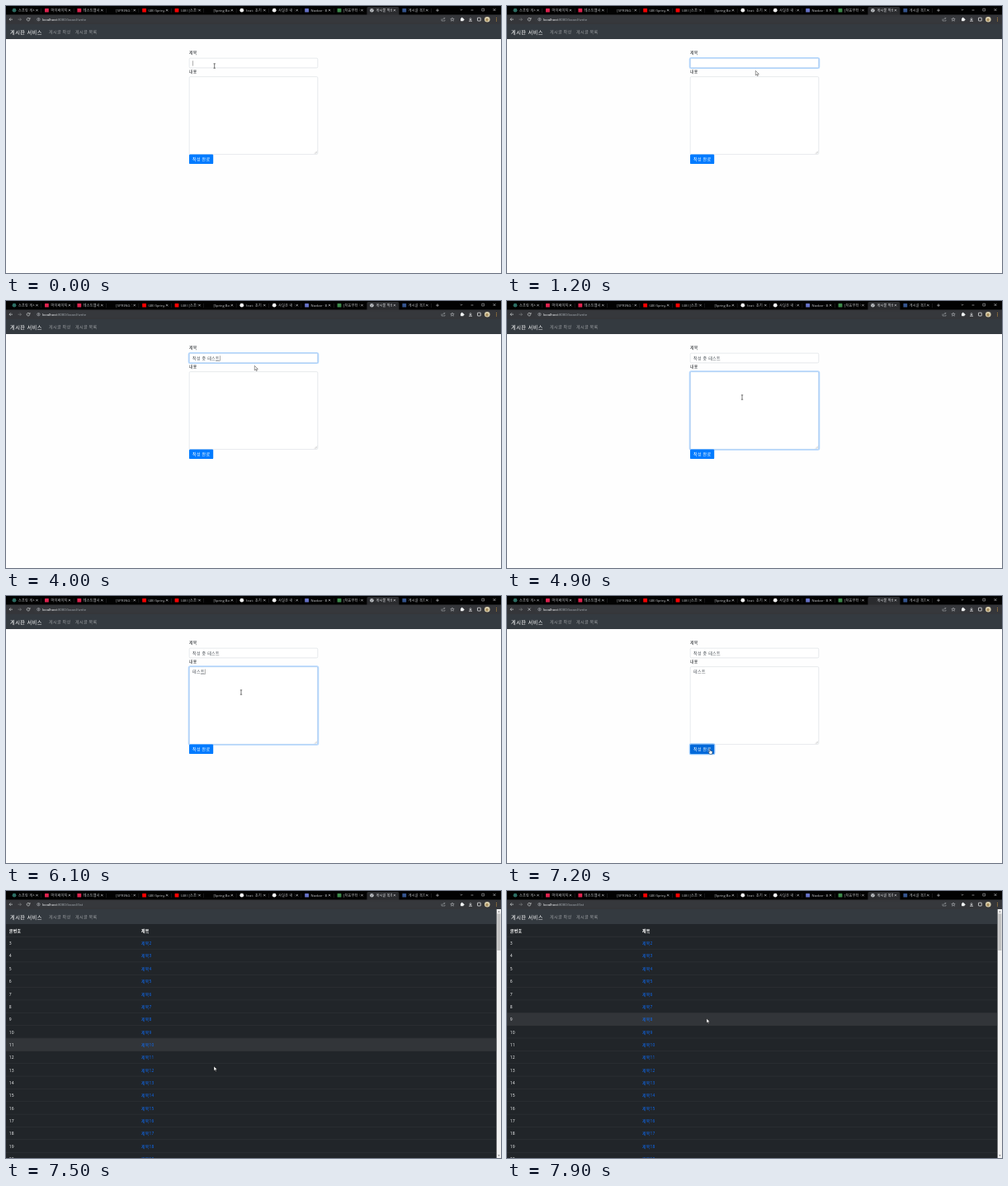
These frames come from a looping animation (600 by 323 pixels, 8000 ms). An HTML page with a canvas:

```html
<!DOCTYPE html>
<html lang="ko">
<head>
<meta charset="utf-8">
<title>게시판 서비스</title>
<style>
html, body { margin: 0; height: 100%; overflow: hidden; background: #fff; }
canvas { display: block; width: 100vw; height: 100vh; }
</style>
</head>
<body>
<canvas id="stage"></canvas>
<script>
const W = 600, H = 323, LOOP = 8000, LIST_AT = 7300;
const canvas = document.getElementById('stage');
const c = canvas.getContext('2d');

// [favicon shape, colour, title]
const tabs = [
  ['circle', '#2c6d63', '스프링 게시판'], ['square', '#e0224e', '마이페이지'],
  ['square', '#e0224e', '테스트웹사이트'], ['', '', '[SPRING 의존'],
  ['square', '#f00', '(48) Spring B'], ['square', '#f00', '(48) [스프링'],
  ['', '', '[Spring Boot'], ['circle', '#f2f2f2', 'feat: 초기 설'],
  ['circle', '#f2f2f2', '사실은 내 것'], ['square', '#6672c8', 'Navbar · Boo'],
  ['square', '#3c8a4a', '[처음부터 하'], ['globe', '#c4c7cb', '게시물 작성'],
  ['square', '#35558f', '게시글 목록']
];

// Hangul input, one composition step per entry
const titleKeys = [[0, ''], [1800, 'ㅈ'], [1900, '자'], [2100, '작'], [2300, '잓'],
  [2400, '작서'], [2600, '작성'], [2900, '작성 '], [3000, '작성 ㅈ'], [3200, '작성 주'],
  [3300, '작성 중'], [3400, '작성 중 ㅌ'], [3500, '작성 중 테'], [3600, '작성 중 텟'],
  [3700, '작성 중 테슽'], [4000, '작성 중 테스트']];
const bodyKeys = [[0, ''], [5000, 'ㅌ'], [5200, '테'], [5300, '텟'], [5500, '테스'], [6100, '테스트']];
const pointer = [[0, 252.7, 72.5, 'beam'], [500, 276, 72.5, 'beam'], [600, 298, 73, 'beam'],
  [800, 301.3, 78.3, 'arrow'], [4400, 285, 116.5, 'beam'], [6600, 270, 150, 'beam'],
  [6700, 256, 180, 'beam'], [6900, 245.5, 185, 'hand'], [7300, 256.2, 200.4, 'arrow'],
  [7500, 252, 212, 'arrow'], [7700, 247, 197, 'arrow'], [7900, 241.9, 154.2, 'arrow']];
const hovers = [[0, 11], [7700, 12], [7900, 9]];
const blinks = [[0, true], [500, false], [800, true], [1200, false], [1400, true]];

const at = (keys, t) => keys.filter(k => k[0] <= t).pop();
const ramp = (t, from, to) => Math.max(0, Math.min(1, (t - from) / (to - from)));

function rect(x, y, w, h, fill) {
  c.fillStyle = fill;
  c.fillRect(x, y, w, h);
}
function round(x, y, w, h, r, fill, stroke, lw = .4) {
  c.beginPath();
  c.roundRect(x, y, w, h, r);
  if (fill) { c.fillStyle = fill; c.fill(); }
  if (stroke) { c.strokeStyle = stroke; c.lineWidth = lw; c.stroke(); }
}
function dot(x, y, r, fill) {
  c.beginPath();
  c.arc(x, y, r, 0, 7);
  c.fillStyle = fill;
  c.fill();
}
function ring(x, y, r, color, from = 0, to = 7) {
  c.beginPath();
  c.arc(x, y, r, from, to);
  c.strokeStyle = color;
  c.lineWidth = .6;
  c.stroke();
}
function path(d, x, y, stroke, lw = .6, fill) {
  const p = new Path2D(d);
  c.save();
  c.translate(x, y);
  if (fill) { c.fillStyle = fill; c.fill(p); }
  c.strokeStyle = stroke;
  c.lineWidth = lw;
  c.stroke(p);
  c.restore();
}
// y is the middle of the line; Hangul is set slightly loose; returns the right end
function text(s, x, y, size, color, weight = 400, family = '"Open Sans"') {
  const hangul = /[ㄱ-ㅎ가-힣]/.test(s);
  c.font = `${weight} ${size}px ${family}, "Noto Sans CJK KR", "Noto Sans CJK", sans-serif`;
  c.letterSpacing = (hangul ? size * .07 : 0) + 'px';
  c.fillStyle = color;
  c.fillText(s, x, y + size * (hangul ? .38 : .36));
  return x + c.measureText(s).width;
}
const cross = (x, y, r, color) => path(`M${-r} ${-r}L${r} ${r}M${r} ${-r}L${-r} ${r}`, x, y, color);

function drawTab([shape, color, title], i, loading, list) {
  const x = 10 + 39.4 * i, active = i === 11;
  if (active) round(x - 6, 1, 39, 11, [2, 2, 0, 0], '#2a2b2e');
  else if (i !== 10) rect(x + 32.5, 3, .4, 5, '#3a3b3e');
  if (shape === 'circle') dot(x, 5.2, 2.4, color);
  if (shape === 'square') round(x - 2.4, 3, 4.8, 4.5, .5, color);
  if (shape === 'globe' && !loading) {
    dot(x, 5.2, 2.3, color);
    path('M-1.6 -.6L.2 .2L-.4 1.6M.6 -1.8L1.6 0', x, 5.2, '#55585c');
  }
  c.save();
  c.beginPath();
  c.rect(x + 4.5, 0, 20, 10);
  c.clip();
  text(active && list ? '게시글 목록' : title, x + 5, 5.2, 4.05, active ? '#e8eaed' : '#c6c8cb');
  c.restore();
  cross(x + 27.5, 5.2, 1.2, '#d0d2d5');
}

function drawBrowser(loading, list) {
  rect(0, 0, W, 11, '#020202');
  tabs.forEach((tab, i) => drawTab(tab, i, loading, list));
  path('M-1.8 0H1.8M0 -1.8V1.8', 523, 5.2, '#d0d2d5');
  path('M-1.3 -.6L0 .7L1.3 -.6', 552, 4.6, '#d0d2d5');
  path('M-1.4 0H1.4', 565, 5, '#d0d2d5');
  round(576.8, 3.2, 2.8, 2.8, 0, null, '#d0d2d5', .5);
  cross(592, 4.6, 1.4, '#d0d2d5');

  rect(0, 10.5, W, 11.5, '#35363a');
  round(33, 12.3, 515, 7.8, 3.9, '#36383c');
  path('M2 0H-2M-.2 -1.8L-2 0L-.2 1.8', 6, 16.2, '#e0e2e5');
  path('M-2 0H2M.2 -1.8L2 0L.2 1.8', 16.5, 16.2, '#85878a');
  if (loading) cross(27, 16.2, 1.6, '#e0e2e5');
  else {
    ring(27, 16.2, 1.8, '#e0e2e5', .3, 5.6);
    path('M2 -2.2V-.3H.2', 27, 16.2, '#e0e2e5');
  }
  ring(39.4, 16.2, 1.7, '#b5b8bc');
  rect(39.1, 15.1, .6, 2.2, '#b5b8bc');
  const x = text('localhost', 44, 16.1, 4.36, '#f1f3f4', 400, 'Roboto');
  text(':8080/board/' + (list ? 'list' : 'write'), x, 16.1, 4.36, '#9aa0a6', 400, 'Roboto');

  path('M-2 -.5V2H2V.8M-.8 .6Q-.6 -1.2 2 -1.2M1 -2.2L2 -1.2L1 -.2', 530, 16, '#b5b8bc', .5);
  path('M0 -2.2L.6 -.7L2.2 -.6L1 .4L1.4 2L0 1.1L-1.4 2L-1 .4L-2.2 -.6L-.6 -.7Z', 541, 16.2, '#c4c7cb', .5);
  round(551, 14.8, 3.6, 3.4, .4, '#f1f3f4');
  dot(552.7, 14.6, .8, '#f1f3f4');
  dot(554.8, 16.5, .8, '#f1f3f4');
  path('M0 -2V1M-1.4 -.3L0 1L1.4 -.3M-2 2H2', 563, 16.2, '#f1f3f4', .7);
  round(571.5, 14.2, 3.8, 3.8, .4, null, '#f1f3f4', .7);
  dot(583.3, 16.2, 3.3, '#d9cfae');
  dot(583, 16.8, 1.7, '#a58a58');
  for (const y of [14.4, 16.2, 18]) dot(594.5, y, .5, '#e0a33e');

  rect(0, 22, W, 18, '#343a40');
  text('게시판 서비스', 5, 31.3, 6.2, '#fff');
  text('게시글 작성', 52, 31.2, 5, '#9a9da0');
  text('게시글 목록', 84, 31.2, 5, '#9a9da0');
}

function drawField(y, h, focus) {
  if (focus) round(221.4, y - .6, 157.2, h + 1.2, 1.8, null, `rgba(0,123,255,${.28 * focus})`, 1.4);
  round(222.2, y, 155.6, h, 1.2, '#fff', '#ced4da', .5);
  if (focus) {
    c.globalAlpha = focus;
    round(222.2, y, 155.6, h, 1.2, null, '#80bdff', .5);
    c.globalAlpha = 1;
  }
}
function drawEntry(s, y, caret, composing) {
  const end = text(s, 226, y, 5, '#495057');
  if (composing && s && !s.endsWith(' ')) rect(end - 5, y + 3, 5, .4, '#495057');
  if (caret) rect(end + .1, y - 3, .4, 6.3, '#333');
}

function drawForm(t) {
  rect(0, 40, W, H - 40, '#fefefe');
  const inTitle = t < 4450, inBody = t >= 4450 && t < 7000;
  const titleGlow = ramp(t, 50, 250) * (1 - ramp(t, 4350, 4500));
  const bodyGlow = ramp(t, 4350, 4500) * (1 - ramp(t, 6950, 7100));
  text('제목', 222, 56.2, 4.9, '#212529');
  drawField(63.2, 11.6, titleGlow);
  text('내용', 222, 78.8, 4.9, '#212529');
  drawField(85.6, 93.8, bodyGlow);
  path('M0 3L3 0M1.6 3L3 1.6', 374, 175.6, '#888', .4);
  drawEntry(at(titleKeys, t)[1], 69.2, inTitle && at(blinks, t)[1], inTitle);
  drawEntry(at(bodyKeys, t)[1], 91.5, inBody && t < 6600 && (t < 4900 || t >= 5000), inBody && t < 6600);

  const hover = t >= 6900, pressed = t >= 7000;
  if (pressed) round(221.4, 178.8, 30.4, 12.9, 1.8, null, 'rgba(38,143,255,.5)', 1.2);
  round(222, 179.4, 29.2, 11.7, 1.2, hover ? '#0069d9' : '#007bff');
  text('작성 완료', 226, 185.2, 5, '#fff');
}

function drawList(t) {
  const pitch = 15.35, top = 55.4, right = 594.7, hover = at(hovers, t)[1];
  rect(0, 40, right, H - 40, '#212529');
  text('글번호', 3.8, 47.8, 4.9, '#fff', 700);
  text('제목', 164, 47.8, 4.9, '#fff', 700);
  rect(0, top - .5, right, .5, '#373b3e');
  for (let n = 3; n < 21; n++) {
    const y = top + pitch * (n - 3);
    if (n === hover) rect(0, y, right, pitch, '#323539');
    rect(0, y + pitch - .4, right, .4, '#373b3e');
    text(n, 3.8, y + 7.9, 5, '#f6f7f8');
    text('제목' + (n - 1), 164, y + 7.9, 4.8, '#0d6efd');
  }
  rect(right, 22, W - right, H - 22, '#f1f1f1');
  rect(right + .6, 27.3, 4.1, 44.7, '#c1c1c1');
  path('M-1 .6L0 -.6L1 .6Z', 597.4, 24.8, '#505050', .1, '#505050');
  path('M-1 -.6L0 .6L1 -.6Z', 597.4, 320.2, '#505050', .1, '#505050');
}

const shapes = {
  arrow: 'M0 0V5.5L1.3 4.3L2.1 6.3L3.1 5.9L2.2 4H4Z',
  hand: 'M0 0Q.8 -.3 .9 .5V2.2L3 2.7Q3.7 3 3.5 4L3 6.3H.2L-1.5 3.9Q-1.3 3 -.2 3.7V.5Z',
  beam: 'M-1.2 -2.7H1.2M0 -2.7V2.7M-1.2 2.7H1.2'
};
function drawPointer(t) {
  const [, x, y, kind] = at(pointer, t);
  if (kind === 'beam') path(shapes.beam, x, y, '#222');
  else path(shapes[kind], x, y, '#000', .4, '#fff');
}

function frame(now) {
  const t = now % LOOP, list = t >= LIST_AT;
  const ratio = window.devicePixelRatio || 1;
  const w = Math.round(innerWidth * ratio), h = Math.round(innerHeight * ratio);
  if (canvas.width !== w || canvas.height !== h) {
    canvas.width = w;
    canvas.height = h;
  }
  c.setTransform(w / W, 0, 0, h / H, 0, 0);
  drawBrowser(t >= 7100 && !list, list);
  (list ? drawList : drawForm)(t);
  drawPointer(t);
  requestAnimationFrame(frame);
}
requestAnimationFrame(frame);
</script>
</body>
</html>
```
